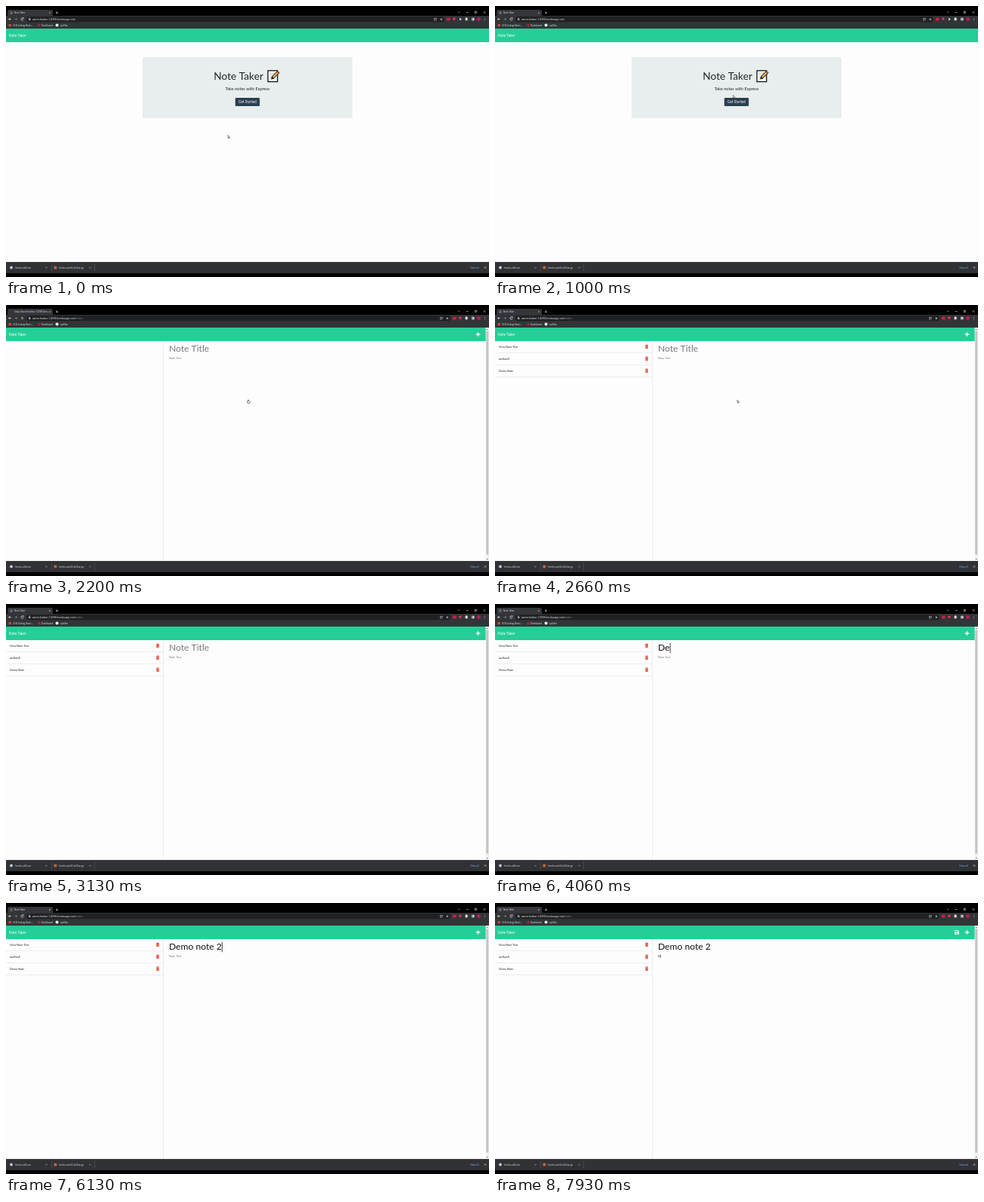
These frames come from a looping animation (640x360 px, 8000 ms). An HTML page with a canvas:

```html
<!DOCTYPE html>
<html lang="en">
<head>
<meta charset="utf-8">
<title>Note Taker</title>
<style>
html, body { margin: 0; width: 100%; height: 100%; overflow: hidden; background: #000; }
canvas { display: block; width: 640px; height: 360px; }
</style>
</head>
<body>
<canvas id="stage" width="640" height="360"></canvas>
<script>
const ctx = document.getElementById('stage').getContext('2d');
const LOOP = 8000;
const LATO = 'Lato, sans-serif';
const UI = '"Open Sans", sans-serif';
const GREEN = '#26ce97';
const NOTES = ['View Note Text', 'asdfsadf', 'Demo Note'];

// Key presses in the title field: time, text so far
const TYPED = [
  [3800, 'D'], [4060, 'De'], [4200, 'Dem'], [4400, 'Demo'], [4800, 'Demo '],
  [4930, 'Demo n'], [5200, 'Demo no'], [5400, 'Demo not'], [5600, 'Demo note'],
  [5660, 'Demo note '], [6130, 'Demo note 2']
];

// Pointer path: time, x, y
const PATH = [
  [0, 294, 171.5], [60, 294, 171.5], [460, 318, 115], [800, 318, 115], [860, 315.5, 118.5],
  [1000, 315.5, 118.5], [1200, 321, 126], [2800, 321, 126], [3130, 262, 58]
];

function rect(x, y, w, h, color) {
  ctx.fillStyle = color;
  ctx.fillRect(x, y, w, h);
}

function round(x, y, w, h, r, color) {
  ctx.fillStyle = color;
  ctx.beginPath();
  ctx.roundRect(x, y, w, h, r);
  ctx.fill();
}

function dot(x, y, r, color) {
  ctx.fillStyle = color;
  ctx.beginPath();
  ctx.arc(x, y, r, 0, Math.PI * 2);
  ctx.fill();
}

function text(str, x, y, size, color, font = LATO, align = 'left') {
  ctx.font = `${size}px ${font}`;
  ctx.textAlign = align;
  ctx.fillStyle = color;
  ctx.fillText(str, x, y);
  return ctx.measureText(str).width;
}

// Each line is a flat list of x, y pairs
function lines(color, width, ...paths) {
  ctx.strokeStyle = color;
  ctx.lineWidth = width;
  ctx.beginPath();
  for (const p of paths) {
    ctx.moveTo(p[0], p[1]);
    for (let i = 2; i < p.length; i += 2) ctx.lineTo(p[i], p[i + 1]);
  }
  ctx.stroke();
}

function poly(color, p) {
  ctx.fillStyle = color;
  ctx.beginPath();
  for (let i = 0; i < p.length; i += 2) ctx.lineTo(p[i], p[i + 1]);
  ctx.closePath();
  ctx.fill();
}

function cross(x, y, r, color, w = 0.6) {
  lines(color, w, [x - r, y - r, x + r, y + r], [x + r, y - r, x - r, y + r]);
}

function chevron(x, y, dir, color) {
  lines(color, 0.6, [x - 1.2, y - 0.6 * dir, x, y + 0.6 * dir, x + 1.2, y - 0.6 * dir]);
}

function tabStrip(loading) {
  round(2, 5, 60, 10, 2, '#35363a');
  if (loading) {
    text('https://warm-harbor-12098.hero…', 11, 10, 2.9, '#e8eaed', UI);
  } else {
    dot(7, 9, 1.7, '#9aa0a6');
    dot(7, 9, 0.9, '#35363a');
    text('Note Taker', 11, 10, 2.9, '#e8eaed', UI);
  }
  cross(58, 9, 0.9, '#cfd1d4', 0.5);
  lines('#dadce0', 0.6, [65.8, 9, 69.2, 9], [67.5, 7.3, 67.5, 10.7]);
  chevron(600, 8.3, 1, '#cfd1d4');
  lines('#dadce0', 0.6, [609.8, 8.5, 612.6, 8.5]);
  ctx.strokeRect(621.3, 7.4, 2.2, 2.2);
  cross(634, 8.5, 1.2, '#dadce0');
}

function toolbar(loading, onNotes) {
  rect(0, 13, 640, 17, '#333438');
  lines('#e0e2e5', 0.7, [7, 17.5, 3.6, 17.5], [5.2, 15.9, 3.6, 17.5, 5.2, 19.1]);
  lines('#85888c', 0.7, [11.4, 17.5, 14.8, 17.5], [13.2, 15.9, 14.8, 17.5, 13.2, 19.1]);
  if (loading) {
    cross(21.5, 17.5, 1.4, '#e0e2e5', 0.7);
  } else {
    ctx.strokeStyle = '#e0e2e5';
    ctx.lineWidth = 0.7;
    ctx.beginPath();
    ctx.arc(21.5, 17.5, 1.6, 0.3, 5.5);
    ctx.stroke();
    rect(22.2, 15.5, 1.3, 1.3, '#e0e2e5');
  }
  const end = onNotes ? 589 : 581;
  round(27, 14, end - 27, 7.2, 3.6, '#202124');
  rect(30.2, 17.2, 2.2, 1.7, '#bdc1c6');
  ctx.lineWidth = 0.4;
  ctx.strokeStyle = '#bdc1c6';
  ctx.strokeRect(30.7, 16, 1.2, 1.3);
  const w = text('warm-harbor-12098.herokuapp.com', 35, 18.7, 3.35, '#f1f3f4', UI);
  if (onNotes) text('/notes', 35 + w, 18.7, 3.35, '#8f949a', UI);

  const s = end - 581;
  ctx.lineWidth = 0.5;
  ctx.strokeStyle = '#bdc1c6';
  ctx.strokeRect(567.4 + s, 16.6, 2.6, 2.4);
  lines('#bdc1c6', 0.5, [568.6 + s, 18, 570.8 + s, 15.9]);
  const star = [];
  for (let i = 0; i < 10; i++) {
    const a = i * Math.PI / 5 - Math.PI / 2, r = i % 2 ? 0.8 : 1.8;
    star.push(576.8 + s + r * Math.cos(a), 17.6 + r * Math.sin(a));
  }
  poly('#aeb2b7', star);
  rect(584 + s, 15.7, 4.4, 3.6, '#d81e3c');
  rect(592.2 + s, 15.7, 3.2, 2.8, '#e23a4e');
  if (!onNotes) poly('#eceef0', [601, 15.5, 604, 18, 602.5, 18.2, 601.2, 19.5]);
  round(608.6, 16, 3, 3.2, 0.4, '#e4e6e9');
  dot(610, 15.9, 0.8, '#e4e6e9');
  rect(617, 15.8, 3.4, 3.4, '#f1f3f4');
  rect(617.6, 16.4, 1.1, 2.2, '#333438');
  dot(626.5, 17.5, 2.4, '#c2185b');
  for (let i = -1; i < 2; i++) dot(634.5, 17.5 + i * 1.4, 0.45, '#dadce0');

  rect(3.5, 24, 3.4, 3.2, '#d4452f');
  text('UCB-Coding Bootc...', 9, 26.7, 2.9, '#e8eaed', UI);
  rect(42.3, 24, 3.2, 3.2, '#b3202c');
  text('Dashboard', 47, 26.7, 2.95, '#e8eaed', UI);
  dot(67.6, 25.6, 2, '#f1f3f4');
  text('quillfen', 72, 26.7, 2.9, '#e8eaed', UI);
}

function downloads() {
  rect(0, 340, 640, 15, '#303236');
  rect(0, 340, 640, 0.5, '#45474b');
  dot(7, 347.5, 2, '#b9c9d2');
  text('heroku-x64.exe', 12, 348.7, 2.95, '#e8eaed', UI);
  chevron(53.5, 347.6, 1, '#cfd1d4');
  rect(60, 342.5, 0.6, 10, '#55575b');
  rect(63.5, 345.6, 3.8, 3.8, '#c0633d');
  text('heroku-win32-x64.tar.gz', 70, 348.7, 2.95, '#e8eaed', UI);
  chevron(111.5, 347.6, -1, '#cfd1d4');
  rect(117, 342.5, 0.6, 10, '#55575b');
  text('Show all', 615, 348.5, 3, '#8ab4f8', UI);
  cross(635, 347.5, 1.2, '#dadce0');
}

function memo() {
  rect(346.4, 85.2, 14, 16, '#111');
  rect(347.7, 86.5, 11.4, 13.4, '#fbfbf8');
  for (let i = 0; i < 4; i++) rect(349.3, 89 + i * 2.5, 6.5 - (i % 2), 0.6, '#aab2b5');
  lines('#111', 4, [353, 95.6, 361.2, 87.2]);
  lines('#f2b84b', 2.3, [353.8, 94.8, 359.8, 88.6]);
  lines('#e8637b', 2.3, [360, 88.4, 361.4, 87]);
  poly('#111', [351.2, 97.4, 352, 94.4, 354.2, 96.6]);
}

function home(t) {
  rect(181, 68, 278, 81, '#e8eeed');
  text('Note Taker', 275.3, 97.8, 13.7, '#212529');
  memo();
  text('Take notes with Express', 320, 112.3, 5.6, '#212529', LATO, 'center');
  const hover = t >= 1060, pressed = t >= 1930;
  if (pressed) round(302.9, 121.1, 34.2, 12.9, 2, '#a3b0b9');
  round(303.8, 122, 32.4, 11.1, 1.4, pressed ? '#18222c' : hover ? '#1f2d3a' : '#2c3e50');
  text('Get Started', 320, 129.2, 4.75, '#fff', LATO, 'center');
}

function trash(x, y) {
  rect(x - 2, y - 2.4, 4, 0.8, '#e74c3c');
  rect(x - 0.8, y - 2.9, 1.6, 0.6, '#e74c3c');
  round(x - 1.7, y - 1.3, 3.4, 4, 0.5, '#e74c3c');
  for (let i = -1; i < 2; i++) rect(x + i - 0.15, y - 0.7, 0.3, 2.7, '#f6b4ac');
}

function saveIcon(x, y) {
  poly('#fff', [x - 2.8, y - 2.8, x + 1.6, y - 2.8, x + 2.8, y - 1.6, x + 2.8, y + 2.8, x - 2.8, y + 2.8]);
  rect(x - 2, y - 2, 3.3, 1.5, GREEN);
  dot(x, y + 1.2, 0.9, GREEN);
}

function field(str, hint, y, size, caret) {
  const w = text(str || hint, 216, y, size, str ? '#111' : '#737a80');
  if (caret) rect(216 + (str ? w : 0) + 0.2, y - size * 0.84, size > 6 ? 0.8 : 0.5, size * 1.1, '#111');
}

function notes(t) {
  rect(208, 48, 0.7, 292, '#dfe2e4');
  if (t >= 2460) {
    NOTES.forEach((name, i) => {
      text(name, 5, 57.3 + i * 15.9, 3.75, '#212529');
      trash(201, 55.4 + i * 15.9);
      rect(0, 63.4 + i * 15.9, 208, 0.6, '#dfe2e4');
    });
  }
  let title = '', last = 3400;
  for (const [at, str] of TYPED) if (t >= at) { title = str; last = at; }
  const inBody = t >= 6860;
  if (inBody) last = t >= 7860 ? 7860 : 6860;
  const caret = t >= 3400 && t - last < 530;
  field(title, 'Note Title', 62.1, 12.1, caret && !inBody);
  field(t >= 7860 ? 'D' : '', 'Note Text', 71.9, 3.75, caret && inBody);

  lines('#fff', 1.3, [622.8, 39, 628.2, 39], [625.5, 36.3, 625.5, 41.7]);
  if (t >= 7930) saveIcon(612, 39);

  rect(635.6, 30, 4.4, 310, '#f1f1f1');
  rect(636.3, 34.5, 3, 297, '#c4c4c4');
  poly('#666', [636.7, 33, 637.8, 31.6, 638.9, 33]);
  poly('#666', [636.7, 337, 637.8, 338.4, 638.9, 337]);
}

function pointer(t) {
  if (t >= 3130) return;
  let i = 0;
  while (i < PATH.length - 2 && t >= PATH[i + 1][0]) i++;
  const [t0, x0, y0] = PATH[i], [t1, x1, y1] = PATH[i + 1];
  const k = (t - t0) / (t1 - t0), e = k * k * (3 - 2 * k);
  ctx.save();
  ctx.translate(x0 + (x1 - x0) * e, y0 + (y1 - y0) * e);
  ctx.lineWidth = 0.5;
  ctx.strokeStyle = '#222';
  ctx.fillStyle = '#fff';
  ctx.beginPath();
  const hand = t >= 1060 && t < 2330;
  const shape = hand
    ? [-0.5, 0, 0.5, 0, 0.5, 1.8, 2.2, 2.3, 2, 4.6, -0.6, 4.6, -1.8, 2.6, -0.5, 2.8]
    : [0, 0, 0, 3.9, 0.9, 3.1, 1.5, 4.4, 2.1, 4.1, 1.5, 2.9, 2.7, 2.8];
  for (let j = 0; j < shape.length; j += 2) ctx.lineTo(shape[j], shape[j + 1]);
  ctx.closePath();
  ctx.fill();
  ctx.stroke();
  ctx.restore();
}

function draw(t) {
  const loading = t >= 2000 && t < 2460;
  const onNotes = t >= 2190;
  rect(0, 0, 640, 360, '#000');
  tabStrip(loading);
  toolbar(loading, t >= 2000);
  rect(0, 30, 640, 310, '#fdfdfd');
  rect(0, 30, 640, 18, GREEN);
  text('Note Taker', 4, 40.9, 4.7, '#fff');
  if (onNotes) notes(t);
  else home(t);
  downloads();
  pointer(t);
}

const start = performance.now();
function tick() {
  draw((performance.now() - start) % LOOP);
  requestAnimationFrame(tick);
}
tick();
</script>
</body>
</html>
```
